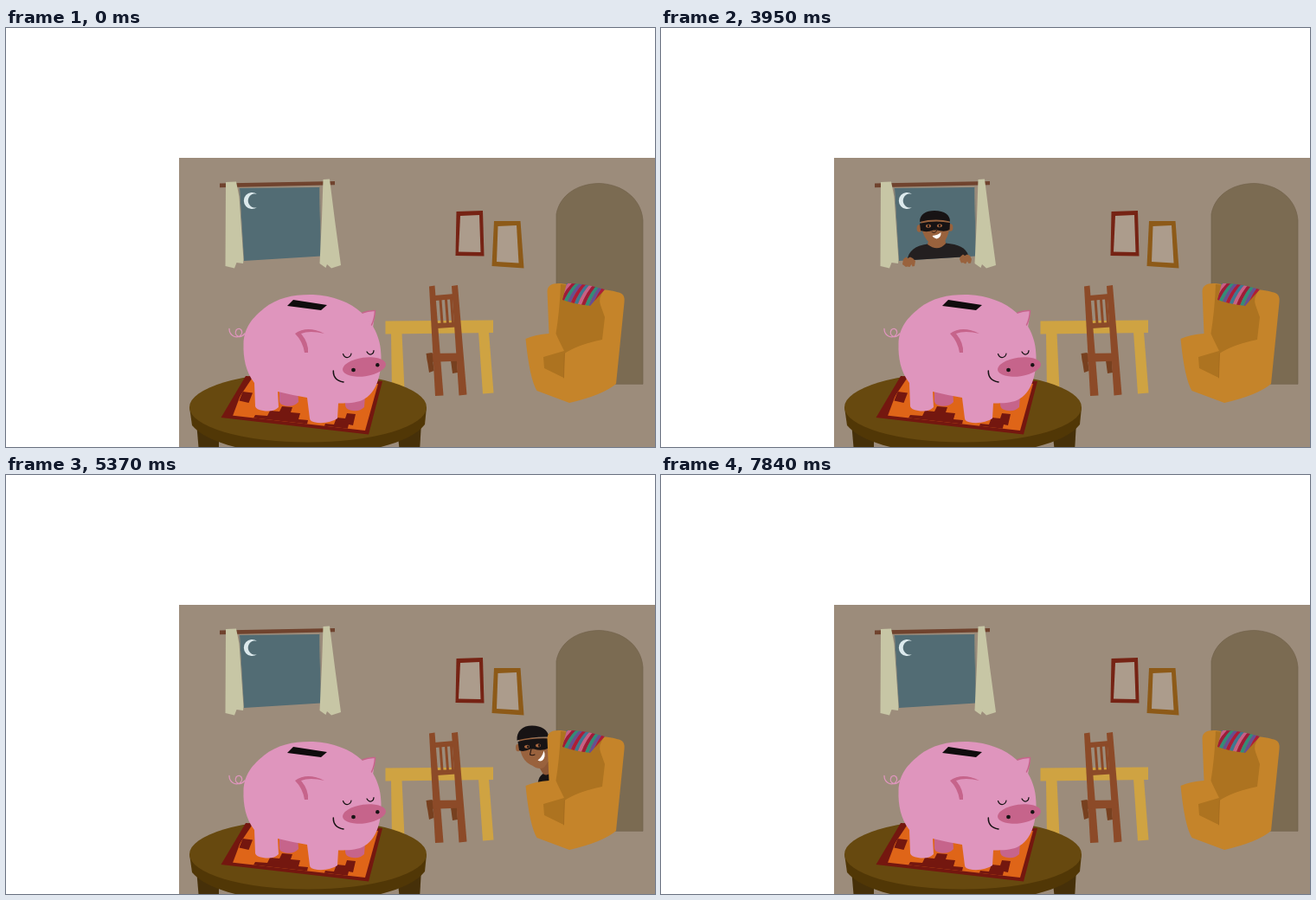
Write an HTML page with a canvas that moves like this. It is 750 px wide and 484 px high and loops after 8000 ms.

```html
<!DOCTYPE html>
<html lang="en">
<head>
<meta charset="utf-8">
<title>Piggy bank at night</title>
<style>
html, body { margin: 0; width: 100%; height: 100%; overflow: hidden; background: #fff; }
canvas { display: block; width: 750px; height: 484px; }
</style>
</head>
<body>
<canvas id="stage"></canvas>
<script>
const LOOP = 8000;
const canvas = document.getElementById('stage');
const dpr = window.devicePixelRatio || 1;
canvas.width = 750 * dpr;
canvas.height = 484 * dpr;
const ctx = canvas.getContext('2d');

const WALL = '#9c8c7b', SKIN = '#99623d', BLACK = '#171314';
const PINK = '#df95bd', ROSE = '#c6648b';
const CHAIR = '#8c4a28', CHAIR_DARK = '#77401f';
const RUG_RED = '#74170f', RUG_ORANGE = '#df6518';

function fill(path, color) {
  ctx.fillStyle = color;
  ctx.fill(new Path2D(path));
}

function line(path, color, width) {
  ctx.strokeStyle = color;
  ctx.lineWidth = width;
  ctx.lineCap = ctx.lineJoin = 'round';
  ctx.stroke(new Path2D(path));
}

function oval(x, y, rx, ry, color, angle = 0) {
  ctx.fillStyle = color;
  ctx.beginPath();
  ctx.ellipse(x, y, rx, ry, angle, 0, Math.PI * 2);
  ctx.fill();
}

function within(path, draw) {
  ctx.save();
  if (path) ctx.clip(new Path2D(path));
  draw();
  ctx.restore();
}

function shifted(dx, dy, draw) {
  within(null, () => { ctx.translate(dx, dy); draw(); });
}

// Number of step times already passed
const passed = (t, times) => times.filter(s => t >= s).length;

const RISE = [1300, 1370, 1430, 1510, 1590, 1670, 1750];
const SINK = [4550, 4650, 4750, 4850, 4950];
const ENTER = [5270, 5290, 5310, 5330, 5350, 5370, 5390];
const LEAVE = [7390, 7440, 7540, 7640, 7740, 7840];
const GLASS = 'M270 185L362 184L364 263.5L275 269Z';

function eye(x, y, look) {
  oval(x, y, 3, 1.9, '#a8663f', -.1);
  oval(x + look, y, 1.2, 1.4, BLACK);
}

function windowThief(look) {
  fill('M284 272C285 258 292 252 308 249.5L329 248.5C344 250 352 254 355 262V272Z', '#231f20');
  fill('M310 242H328L329 249Q320 259 308 250Z', SKIN);
  oval(298.5, 231.5, 2.9, 4.3, SKIN);
  oval(334.5, 230.5, 2.9, 4.3, SKIN);
  fill('M300 220H333C335 233 331 244 325 249Q319 253 312 249C305 245 300 234 300 220Z', SKIN);
  fill('M299 224C299 215 306 211 316 211C328 211 334 216 334 223.5Q317 219.5 299 224Z', BLACK);
  fill('M299 225.8Q317 221.5 334 225L333.5 233Q328 236 319 233.5H315Q307 236.5 300 234Z', BLACK);
  eye(309, 228.7, look);
  eye(322, 228.4, look);
  line('M318 232Q320 236 315 236.5L313 235.5', '#3c2419', 1);
  fill('M313.5 240Q320 239.5 323.5 236Q324 242 318.5 243.5Q315 243 313.5 240Z', '#fff');
}

function hands() {
  fill('M280 267L283 264.5L285 266L288 264.5L291 266L294 269L293 275L290.5 275.5L289.5 273L287.5 276L284.5 275.5L283 276L279 273Z', SKIN);
  fill('M346 264L349 261.5L351 263L354 261.5L357 263L359 267L358 271.5L355.5 272L354 269.5L352 272.5L349 271L347 271.5L345 267Z', SKIN);
}

function sideThief(look) {
  fill('M616 366C614 353 618 346 628 344.5H650V370Z', BLACK);
  fill('M613 332H629L632 344Q624 352 620 344Z', '#8c5736');
  oval(592.8, 316.5, 2.8, 4.2, SKIN);
  fill('M594 305H628C632 319 630 332 623 339Q617 343 609 337C600 333 594 325 594 305Z', SKIN);
  fill('M591.5 308C591 297 598 291 609 291C620 291 627 296 628.5 304Q610 303.5 591.5 308Z', BLACK);
  fill('M592.5 309.5Q610 305 628.5 306L628 317Q620 321 611 318H607Q599 322 594 319.5Z', BLACK);
  eye(603, 315.3, look);
  eye(616, 314, look);
  line('M608 318L606.5 324.5Q609 326 612 324.5', '#20120f', 1.1);
  fill('M615.5 331Q621 327 622.5 320Q625.5 327 620.5 331.5Q618 332.5 615.5 331Z', '#fff');
}

function nightWindow(t) {
  fill(GLASS, '#526c74');
  line('M269.5 185L274.5 269M362.5 184L364.5 263.5', '#7b8078', .8);
  fill('M290 191.7A9.6 9.6 0 1 0 290 207.3A8.1 8.1 0 1 1 290 191.7Z', '#dce9ec');

  const up = passed(t, RISE), down = passed(t, SINK);
  const drop = 57.75 - 8.25 * up + 11.55 * down;
  if (up && down < SINK.length) {
    const look = [0, -1.7, 1.7, 0][passed(t, [2750, 3350, 3950])];
    within(GLASS, () => shifted(0, drop, () => windowThief(look)));
  }

  fill('M247 179.5L380 177V181.3L247 184.3Z', '#70432e');
  fill('M254 178L266 177.5L269.5 195L274.5 268L274 272L266.5 271L264 277.5L253.5 275Z', '#c7c6a5');
  fill('M366.5 175L374 174.5L380 222L387 274L376 277.5L371 273L369.5 277L362.5 272L365 220Z', '#c7c6a5');

  if (t >= 900 && t < 5150) hands();
  else if (t >= 500 && t < 5250) {
    const lift = t < 700 ? -2 : t < 900 ? -5 : -3;
    within(GLASS, () => shifted(-2, lift, hands));
  }
}

function pictures() {
  fill('M520.5 212L551 211L552.5 263.5L519.5 263Z', '#762314');
  fill('M525 217L547 216L548.5 259L523 258.5Z', '#ac9c8c');
  fill('M564 223L594.5 223L598.5 277.5L561.5 275Z', '#8d5a18');
  fill('M568.5 229L590 228L592.5 271.5L567 270Z', '#ac9c8c');
}

function door() {
  const arch = 'M636 411V215C640 193 660 180 685 179.5C711 180 734 196 736 222V411Z';
  fill(arch, '#7b6b52');
  line(arch, '#71624b', .7);
}

function diningSet() {
  fill('M438.5 338.5L563 337.5V352L438.5 353.5Z', '#cfa342');
  fill('M445 352H457.5L460.5 418L446 420Z', '#cfa342');
  fill('M546 351H558L563.5 421.5L551 422.5Z', '#cfa342');
  fill('M514 384H521L522 398L516 399Z', CHAIR_DARK);
  fill('M489 298.5L495.5 297.5L505.5 424.5L496 425Z', CHAIR);
  fill('M515 298L522 297L532.5 423.5L523.5 424.5Z', CHAIR);
  fill('M495 309L518 307V313L496 315ZM497 341L520 340V345.5L498 347Z', CHAIR);
  line('M502 314L504 341M508.5 314L510.5 341M514.5 313L516.5 341', CHAIR, 3);
  fill('M486 376L527 375.5L528.5 384.5L487 386Z', CHAIR);
  fill('M485.5 376L492.5 375L494.5 396L489 398Z', CHAIR_DARK);
}

function armchair() {
  fill('M625.5 304Q626 294 641 295L687 302Q700 303 706 305Q716 306 714.5 317L705 411Q690 424 651 433L613.5 419Q605 405 600.5 359Q612 354 627.5 353Z', '#c5842a');
  fill('M641 296L691 303Q684 312 687 320L692 334L689 360Q660 366 645.5 376L644.5 404L622 393L621 380L645 373Q638 359 635.5 353Q640 325 641 296Z', '#ad7320');
  line('M645.5 376L644.5 404', '#9c661d', .6);

  const bands = ['#ad1c38', '#3f7793', '#c76085', '#9f1b39', '#338c78', '#674f91'];
  within('M648 295Q666 294 692 302L675 321Q657 319 643 314Z', () => {
    for (let i = 0; i < 18; i++) {
      const x = 620 + i * 4.4;
      line(`M${x + 30} 290Q${x + 14} 300 ${x + 6} 324`, bands[i % bands.length], 3.9);
    }
  });
}

function roundTable() {
  fill('M220 455L246 472V490H223Z', '#463009');
  fill('M480 455L453 472L455 490H478Z', '#463009');
  fill('M212 438L215 459C232 480 285 493 349 493S467 480 484 458L486 438Z', '#513706');
  oval(349, 438, 137, 40.5, '#67490f');
}

function rug() {
  fill('M277 402L435 408L419 469.5L248.5 450Z', RUG_RED);
  within('M284 405L430 411L415 465L256 447Z', () => {
    fill('M280 400H440V480H250Z', RUG_ORANGE);
    fill('M273.5 420L285 421.5L280.5 433L269.5 430.5Z', RUG_RED);
    fill('M284 454L288 447L302 448L305 442L316 443L319 437L331 438L329 444L340 445L338 452L349 453L347 462Z', RUG_RED);
    fill('M366 464L369 457L379 458L382 450L392 451L394 445L404 446L401 459L396 458L394 466Z', RUG_RED);
  });
}

function pig() {
  line('M276 353C270 360 263 355 266 349C270 344 276 351 270 356C264 359 258 354 258 347.5', PINK, 1.3);
  fill('M316 415H337L338 432Q333 438 323 436.5Q316 435 316 431Z', ROSE);
  fill('M392 425H415L414 438Q408 444 398 441.5Q392 440 392 435Z', ROSE);
  fill('M411 330Q418 326 427 326L424 346L412 344Z', PINK);
  fill('M274.5 365C275 345 286 334 298 324C314 311 334 307.5 355 308C378 309 398 317 411 329C423 339 433.5 357 433.5 379C434 405 426 425 409 431C400 433.5 391 433.5 384 433.5L383 451Q374 457 360 456Q351 455 351 451L348 427Q330 424 314 420L315 438Q309 444 297 442Q289 441 288 437L287 410C277 397 274 381 274.5 365Z', PINK);
  line('M412 329Q419 326 426.5 326.5Q426 336 422.5 343', ROSE, 1.5);
  fill('M334 353Q348 343 368 353Q351 349 341 353Q350 364 349 375L345 375Q343 362 334 353Z', ROSE);
  fill('M332 314L371 320L364 326L325 321Z', '#0f0c0d');
  oval(414, 391.5, 25.2, 10.8, ROSE, -.14);
  oval(401.5, 395, 2.4, 2.3, BLACK);
  oval(429.3, 389.2, 2.2, 2.2, BLACK);
  line('M389.5 376.5Q391 381 395 380.5Q398.5 379.5 399 376M417 374Q419 377.5 422 377Q425 376 425 372.5', BLACK, 1.2);
  line('M378.3 396Q378 407 390 409', BLACK, 1.5);
}

function peek(t) {
  const inSteps = passed(t, ENTER), outSteps = passed(t, LEAVE);
  if (!inSteps || outSteps === LEAVE.length) return;
  const hidden = ENTER.length - inSteps;
  const look = [1.2, -1.5, 0][passed(t, [5890, 6390])];
  shifted(-8 + 7 * hidden + 8 * outSteps, -10 + 8.5 * hidden + 10 * outSteps, () => sideThief(look));
}

function render(t) {
  ctx.setTransform(dpr, 0, 0, dpr, 0, 0);
  ctx.fillStyle = '#fff';
  ctx.fillRect(0, 0, 750, 484);
  within('M200 150H750V484H200Z', () => {
    ctx.fillStyle = WALL;
    ctx.fillRect(200, 150, 550, 334);
    nightWindow(t);
    pictures();
    door();
    diningSet();
    peek(t);
    armchair();
    roundTable();
    rug();
    pig();
  });
}

function tick() {
  render(performance.now() % LOOP);
  requestAnimationFrame(tick);
}
tick();
</script>
</body>
</html>
```
